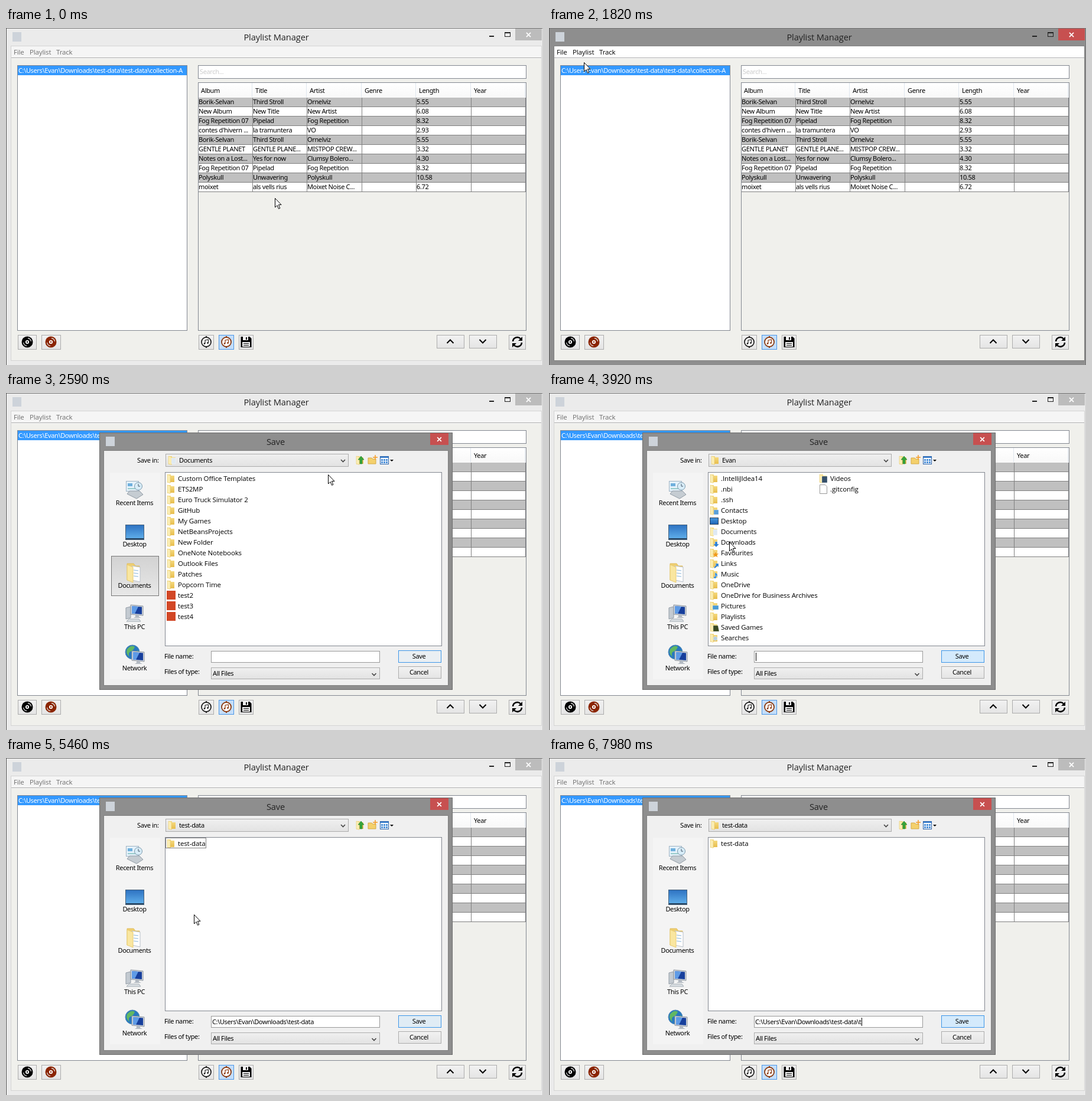
Write an HTML page with a canvas that moves like this. It is 909 px wide and 571 px high and loops after 8000 ms.

```html
<!DOCTYPE html>
<html lang="en">
<head>
<meta charset="utf-8">
<title>Playlist Manager</title>
<style>
html, body { margin: 0; width: 100%; height: 100%; overflow: hidden; background: #ebebeb; }
canvas { display: block; }
</style>
</head>
<body>
<canvas width="909" height="571"></canvas>
<script>
const ctx = document.querySelector('canvas').getContext('2d');
const LOOP = 8000, STEP = 70;
const FONTS = {
  small: ['11px "Noto Sans", sans-serif', '-0.36px'],
  ui: ['11.5px "Open Sans", sans-serif', '-0.13px'],
  title: ['14.6px "Open Sans", sans-serif', '-0.1px']
};

// Moments when the state changes
const FOCUS = 1120, DIALOG = 2310, GO_UP = 3360, GO_DOWNLOADS = 4200, GO_DATA = 5460,
  HIDE_POINTER = 6650, CLICK_FIELD = 6930, TYPE_SLASH = 7560, TYPE_T = 7840;

// Pointer path: time, x, y
const PATH = [
  [0, 455, 288], [70, 455, 288], [140, 449, 287], [280, 446, 282], [1050, 246, 50], [1260, 246, 50],
  [1540, 39, 46], [1610, 59, 58], [1820, 59, 58], [2520, 545, 138], [2660, 545, 138],
  [3220, 600, 99], [3290, 598, 106], [3430, 598, 106], [3850, 305, 252], [4270, 305, 252],
  [4550, 340, 223], [4690, 333, 242], [5110, 318, 265], [5600, 318, 265], [5950, 324, 250],
  [6160, 400, 187], [6440, 664, 449], [6510, 684, 455], [6580, 660, 461], [6790, 585, 447], [8000, 585, 447]
];

const TRACKS = `Borik-Selvan|Third Stroll|Ornelviz|5.55
New Album|New Title|New Artist|6.08
Fog Repetition 07|Pipelad|Fog Repetition|8.32
contes d'hivern ...|la tramuntera|VO|2.93
Borik-Selvan|Third Stroll|Ornelviz|5.55
GENTLE PLANET|GENTLE PLANE...|MISTPOP CREW...|3.32
Notes on a Lost...|Yes for now|Clumsy Bolero...|4.30
Fog Repetition 07|Pipelad|Fog Repetition|8.32
Polyskull|Unwavering|Polyskull|10.58
moixet|als vells rius|Moixet Noise C...|6.72`.split('\n').map(r => r.split('|'));

// First letter of each entry selects its icon
const list = s => s.split('|');
const DOCUMENTS = list('fCustom Office Templates|fETS2MP|fEuro Truck Simulator 2|fGitHub|fMy Games|fNetBeansProjects|fNew Folder|fOneNote Notebooks|fOutlook Files|fPatches|fPopcorn Time|htest2|htest3|htest4');
const HOME = list('f.IntelliJIdea14|f.nbi|f.ssh|cContacts|tDesktop|dDocuments|DDownloads|sFavourites|lLinks|mMusic|fOneDrive|fOneDrive for Business Archives|pPictures|fPlaylists|gSaved Games|qSearches');
const HOME_2 = list('vVideos|w.gitconfig');
const DOWNLOADS = list('fdel|fets2mp_client|fets2mp_client (1)|fhashcat-0.47|fLogs|fVelvet Chart v.1.2|fPhotoshop CS6|ftest-data|fYetiPro_Windows7_DriverA|fYetiPro_Windows8_DriverA|i20140224_110523|i20140306_083124|i20140306_083151|bactualize|rbootstrap-3.3.1-dist');
const DOWNLOADS_2 = list('hHarbour|hHarbourValleyMP3|hHarbourMP3 (1)|hHarbourMP3|hHarbourMP3Low|jchromeinstall-8u25|rcommons-io-2.4-bin|WCV 2014 (1)|WCV 2014 (2)|WCV 2014|wGrim Raven Tides poster.psd|bdelete30 (1)|bdelete30|odeluge-1.3.10-win32-setup|iDSC_0061');

function fill(x, y, w, h, color) {
  ctx.fillStyle = color;
  ctx.fillRect(x, y, w, h);
}
function box(x, y, w, h, color, edge) {
  fill(x, y, w, h, edge);
  fill(x + 1, y + 1, w - 2, h - 2, color);
}
function fade(y0, y1, a, b) {
  const g = ctx.createLinearGradient(0, y0, 0, y1);
  g.addColorStop(0, a);
  g.addColorStop(1, b);
  return g;
}
function shape(d, x, y, color, edge, width = 1) {
  const p = new Path2D(d);
  ctx.save();
  ctx.translate(x, y);
  if (color) { ctx.fillStyle = color; ctx.fill(p); }
  if (edge) { ctx.strokeStyle = edge; ctx.lineWidth = width; ctx.stroke(p); }
  ctx.restore();
}
function disc(x, y, r, color, edge, width = 1) {
  ctx.beginPath();
  ctx.arc(x, y, r, 0, 7);
  if (color) { ctx.fillStyle = color; ctx.fill(); }
  if (edge) { ctx.strokeStyle = edge; ctx.lineWidth = width; ctx.stroke(); }
}
function text(s, x, y, font = 'small', color = '#000', align = 'left') {
  [ctx.font, ctx.letterSpacing] = FONTS[font];
  ctx.fillStyle = color;
  ctx.textAlign = align;
  ctx.fillText(s, x, y);
}
function button(x, y, w, h, on) {
  box(x, y, w, h, on ? '#c4defa' : fade(y, y + h, '#f2f2f2', '#e4e4e4'), on ? '#4b96e6' : '#acacac');
}
const logo = (x, y) => fill(x, y, 15, 16, '#cdd3da');

function note(x, y, color) {
  disc(x, y, 8, '#fff', color, 1.8);
  shape('M-2 2.500V-3L3.500-4V1.500', x, y, null, color, 1.2);
  disc(x - 3, y + 2.7, 1.4, color);
  disc(x + 2.5, y + 1.7, 1.4, color);
  fill(x - 1, y - 10, 2, 2, color);
  fill(x - 1, y + 8, 2, 2, color);
}
function record(x, y, color) {
  disc(x, y, 9.5, color);
  shape('M1-6.500A6.500 6.500 0 0 1 6.500-1M-1 6.500A6.500 6.500 0 0 1-6.500 1', x, y, null, '#ddd', 1.3);
  disc(x, y, 2.2, null, '#fff', 1.8);
}
function closeMark(x, y, r) {
  shape(`M${-r} ${-r}L${r} ${r}M${r} ${-r}L${-r} ${r}`, x, y, null, '#fff', 1.7);
}

function mainWindow(active) {
  fill(0, 0, 909, 571, active ? '#8e8e8e' : '#ebebeb');
  fill(0, 0, 909, 1, '#777');
  fill(0, 0, 1, 571, '#555');
  fill(908, 0, 1, 571, active ? '#777' : '#c8c8c8');
  logo(11, 7);
  text('Playlist Manager', 457.5, 21, 'title', '#222', 'center');
  fill(818, 13, 8, 2, '#222');
  ctx.strokeStyle = '#222';
  ctx.lineWidth = 1;
  ctx.strokeRect(844.5, 7.5, 9, 7);
  fill(844, 7, 10, 2, '#222');
  fill(862, 1, 45, 20, active ? '#c75050' : '#bcbcbc');
  closeMark(884.5, 11.5, 3.6);

  box(8, 30, 899, 534, '#f0f0ec', active ? '#828282' : '#d4d4d4');
  fill(9, 31, 897, 19, active ? '#fff' : '#f5f5f5');
  fill(9, 50, 897, 1, '#a9a9a9');
  fill(9, 51, 897, 1, '#fff');
  const ink = active ? '#000' : '#6d6d6d';
  [['File', 13], ['Playlist', 40], ['Track', 85]].forEach(([s, x]) => text(s, x, 45, 'ui', ink));

  box(19, 63, 288, 450, '#fff', '#828790');
  fill(20, 64, 286, 16, '#3399ff');
  text('C:\\Users\\Evan\\Downloads\\test-data\\test-data\\collection-A', 21, 76, 'small', '#fff');
  box(325, 63, 556, 23, '#fff', '#828790');
  text('Search...', 328, 78, 'small', '#ccc');
  table();

  button(20, 520, 32, 25);
  record(36, 532, '#000');
  button(60, 520, 33, 25);
  record(76, 532, '#8b2500');
  button(326, 520, 26, 25);
  note(339, 532, '#222');
  button(360, 520, 26, 25, true);
  note(373, 532, '#8b3a10');
  button(394, 520, 25, 25);
  shape('M-9-9H6L9-6V9H-9Z', 406.5, 532, '#000');
  fill(401, 523, 9, 6, '#eee');
  fill(406, 524, 2, 4, '#000');
  fill(400, 532, 13, 8, '#eee');
  fill(402, 534, 9, 1, '#000');
  fill(402, 537, 9, 1, '#000');
  button(729, 520, 47, 23);
  shape('M-5.5 3L0-2.5L5.5 3', 752, 531, null, '#000', 2);
  button(784, 520, 47, 23);
  shape('M-5.5-3L0 2.5L5.5-3', 807, 531, null, '#000', 2);
  button(851, 520, 29, 25);
  shape('M-7.5-1A7.5 7.5 0 0 1 5.5-5.5M7.5 1A7.5 7.5 0 0 1-5.5 5.5', 865.5, 532, null, '#000', 2.5);
  shape('M8.5-9V-2H1.5ZM-8.5 9V2H-1.5Z', 865.5, 532, '#000');
}

function table() {
  const edges = [417, 509, 602, 694, 787, 879];
  box(325, 92, 556, 421, '#f0f0ec', '#828790');
  fill(326, 93, 554, 25, fade(93, 118, '#fff', '#f8f8f8'));
  ['Album', 'Title', 'Artist', 'Genre', 'Length', 'Year'].forEach((s, i) => {
    text(s, [330, 422, 514, 607, 699, 792][i], 110);
    fill(edges[i] - 1, 93, 1, 24, '#dfe6ee');
  });
  TRACKS.forEach((row, r) => {
    const y = 118 + 16 * r;
    fill(326, y, 554, 15, r % 2 ? '#fff' : '#c0c0c0');
    fill(326, y + 15, 554, 1, '#808080');
    row.forEach((s, i) => text(s, [326, 418, 510, 695][i], y + 11));
  });
  edges.forEach(x => fill(x, 118, 1, 160, '#808080'));
}

// Small marks laid over the folder icon
const BADGES = {
  c: ['M7 7h8v8h-8z', '#5aa0d8'], d: ['M6 4h7v10h-7z', '#dfe9f2'],
  D: ['M9 7h4v4h3l-5 5-5-5h3z', '#2b7fd6'], s: ['M10 5l1.5 4h4l-3 2.5 1 4-3.500-2-3.500 2 1-4-3-2.500h4z', '#f09a1a'],
  l: ['M7 15l4-5-2-2h6v6l-2-2-4 4z', '#2b7fd6'], m: ['M9 5l4 3v4h-2v-3v6h-4v-3h2z', '#2f8bdc'],
  p: ['M5 7h10v7h-10z', '#4a9bd4'], g: ['M6 5h8l2 10h-10z', '#3a4a22'],
  q: ['M13 9a3.500 3.500 0 1 1-7 0a3.500 3.500 0 1 1 7 0M6 12l-3 4', '#b9cfdd'], v: ['M5 4h9v11h-9z', '#35506a']
};
const SQUARES = { h: '#d24726', W: '#2b579a', r: '#5a2b52' };

function folder(x, y) {
  shape('M1 1H7V14.500H1ZM7 3H13V14H7Z', x, y, fade(0, 15, '#f8e08a', '#e6bb49'));
  shape('M1 1L6 2.500V15.500L1 14Z', x, y, '#fbeeb4', '#e9cc70', .6);
}
function icon(kind, x, y) {
  if (SQUARES[kind]) fill(x, y, 15, 15, SQUARES[kind]);
  else if (kind === 'b') {
    box(x, y + 2, 15, 12, '#6b2c10', '#a9794f');
    fill(x + 3, y + 5, 5, 5, '#d98328');
  } else if (kind === 'i' || kind === 't') {
    box(x, y + 2, 15, 12, fade(y, y + 14, '#4fa3e6', '#1c62b4'), kind === 'i' ? '#b4bcc4' : '#345');
    if (kind === 'i') shape('M2 11L6 7L9 10L11 8L14 12H2Z', x, y, '#dcebf2');
  } else if (kind === 'w') shape('M1.500.5H10.500L13.500 3.500V15.500H1.500Z', x, y, '#fff', '#999');
  else if (kind === 'j') logo(x, y);
  else if (kind === 'o') disc(x + 8, y + 8, 5.5, '#3f6f96');
  else {
    folder(x, y);
    if (BADGES[kind]) shape(BADGES[kind][0], x, y, BADGES[kind][1], '#fff8', .6);
  }
}
function files(names, x, textX) {
  names.forEach((s, i) => {
    const y = 137 + 18 * i;
    icon(s[0], x, y);
    text(s.slice(1), textX, y + 12, 'ui');
  });
}
function dashed(x, y, w, h) {
  ctx.setLineDash([1, 1]);
  ctx.strokeStyle = '#000';
  ctx.lineWidth = 1;
  ctx.strokeRect(x + .5, y + .5, w, h);
  ctx.setLineDash([]);
}
// Tilted screen on a small stand
function monitor(x, y) {
  shape('M0 0L21 2V18L0 16Z', x, y, '#d3d8de', '#8b949e');
  shape('M2 2L19 3.500V16L2 14.500Z', x, y, '#173f9c');
  shape('M2 2L13 3L7 15L2 14.500Z', x, y, '#5f9be6');
  shape('M8 17H14V20L18 22H5L8 20Z', x, y, '#b4bbc3');
}

function places(selected) {
  fill(176, 135, 85, 350, '#f4f4f4');
  if (selected) box(178, 276, 81, 68, fade(276, 344, '#d2d2d2', '#e8e8e8'), '#777');
  box(203, 149, 22, 18, '#e4f1fa', '#9fb4c4');
  fill(206, 153, 8, 5, '#6fb0dd');
  fill(206, 161, 15, 2, '#9cc');
  disc(224, 158, 6.5, '#d8edf8', '#7d98ab');
  shape('M0-4V0H3', 224, 158, null, '#456');
  shape('M-12 0L-8-5H9L15 1L4 8Z', 217, 171, '#c5ccd2', '#929ca5');
  box(202, 223, 32, 26, fade(223, 249, '#2c70c0', '#64b4ee'), '#47627c');
  fill(203, 246, 30, 2, '#26435f');
  shape('M0 0H11L14 4H21V28H0Z', 205, 289, '#efcf72', '#e0bd5c');
  shape('M8 4L22 6V31L8 28Z', 205, 289, '#fff', '#b8bfc8');
  shape('M11 11L19 12M11 16L19 17M11 21L19 22', 205, 289, null, '#8ab5d8');
  shape('M0 2L10 6V32L0 28Z', 205, 289, '#f9e6a0', '#e8cc74');
  shape('M0 3L8 1V20L0 22Z', 203, 361, '#c3cad1', '#949da6');
  monitor(211, 359);
  shape('M-9 0H8L11 4H-13Z', 217, 383, '#dbe0e4', '#a2abb3');
  disc(214, 439, 12, '#2878c0', '#5b90b8');
  shape('M-9-5Q-2-13 4-9Q2-3-3-1T-5 8Q-12 3-9-5M4 0L10-3L8 6Z', 214, 439, '#62b862');
  monitor(213, 437);
  ['Recent Items', 'Desktop', 'Documents', 'This PC', 'Network'].forEach((s, i) =>
    text(s, 217.5, 190 + 70 * i, 'small', '#000', 'center'));
}

function dialog(t, over) {
  const stage = t < GO_UP ? 0 : t < GO_DOWNLOADS ? 1 : t < GO_DATA ? 2 : 3;
  box(158, 67, 598, 436, '#8e8e8e', '#6c6c6c');
  box(165, 97, 584, 399, '#f0f0f0', '#808080');
  logo(169, 74);
  text('Save', 456.5, 88, 'title', '#222', 'center');
  fill(718, 68, 31, 20, '#c75050');
  closeMark(733.5, 78.5, 3.4);

  text('Save in:', 222, 118);
  box(270, 103, 310, 22, fade(103, 125, '#f0f0f0', '#e2e2e2'), '#acacac');
  icon('dfDf'[stage], 274, 106);
  text(['Documents', 'Evan', 'Downloads', 'test-data'][stage], 293, 118);
  const chevron = (x, y) => shape('M-3.500-2L0 1.500L3.500-2', x, y, null, '#444', 1.6);
  chevron(570.5, 115);
  folder(592, 106);
  shape('M-1 7V0H-4L1-6L6 0H3V7Z', 600, 113, '#35a53a', '#207a28', .6);
  shape('M0 3H6L8 5H13V13H0Z', 613, 107, '#f4d06c', '#d5aa42');
  shape('M0-4V4M-4 0H4', 625, 109, null, '#f59a23', 1.5);
  box(633, 107, 15, 14, '#fff', '#2860a8');
  fill(634, 108, 13, 2, '#3f83d0');
  for (let i = 0; i < 6; i++) fill(635 + i % 3 * 4, 112 + (i / 3 | 0) * 4, 3, 3, '#4a8fd8');
  shape('M0 0H6L3 3Z', 650, 113, '#000');
  places(stage === 0);

  box(269, 134, 469, 295, '#fff', '#828790');
  if (stage === 0) files(DOCUMENTS, 272, 291);
  if (stage === 1) {
    files(HOME, 272, 291);
    files(HOME_2, 457, 476);
  }
  if (stage === 2) {
    files(DOWNLOADS, 272, 291);
    files(DOWNLOADS_2, 519, 539);
    dashed(270, 135, 41, 17);
    fill(270, 412, 467, 16, '#f0f0f0');
    fill(287, 412, 135, 15, '#cdcdcd');
    shape('M2-3.500L-1.500 0L2 3.500', 278, 420, null, '#444', 1.6);
    shape('M-2-3.500L1.500 0L-2 3.500', 729, 420, null, '#444', 1.6);
  }
  if (stage === 3) {
    files(['ftest-data'], 272, 291);
    if (t < CLICK_FIELD) dashed(270, 135, 68, 17);
  }

  text('File name:', 268, 450);
  box(347, 437, 286, 20, '#fff', '#999');
  let path = stage < 2 ? '' : 'C:\\Users\\Evan\\Downloads' + (stage > 2 ? '\\test-data' : '');
  if (t >= TYPE_SLASH) path += '\\';
  if (t >= TYPE_T) path += 't';
  text(path, 349, 451);
  const caret = stage < 2 ? t % 1000 >= 600 : t >= CLICK_FIELD && (t < 7420 || t >= TYPE_SLASH);
  if (caret) fill(Math.round(350 + ctx.measureText(path).width), 440, 1, 14, '#000');

  text('Files of type:', 268, 476);
  box(347, 465, 286, 20, fade(465, 485, '#f0f0f0', '#e2e2e2'), '#acacac');
  text('All Files', 350, 479);
  chevron(623, 477);
  // The default button glows slowly, and fully under the pointer
  const glow = over ? 1 : .5 + .5 * Math.cos((t - 3920) / 2030 * 2 * Math.PI);
  box(664, 436, 73, 21, '#efefef', '#3c96e8');
  fill(665, 437, 71, 19, `rgba(212,234,252,${glow})`);
  text('Save', 699, 450, 'small', '#000', 'center');
  button(664, 463, 73, 21);
  text('Cancel', 699, 477, 'small', '#000', 'center');
}

function pointerAt(t) {
  const i = Math.max(1, PATH.findIndex(k => k[0] > t));
  const [a, x0, y0] = PATH[i - 1], [b, x1, y1] = PATH[i];
  const u = (t - a) / (b - a), e = u * u * (3 - 2 * u);
  return [Math.round(x0 + (x1 - x0) * e), Math.round(y0 + (y1 - y0) * e)];
}

function draw(now) {
  const t = Math.floor(now % LOOP / STEP) * STEP;
  const [x, y] = pointerAt(t);
  mainWindow(t >= FOCUS && t < DIALOG);
  if (t >= DIALOG) dialog(t, x > 664 && x < 737 && y > 436 && y < 457);
  if (t < HIDE_POINTER)
    shape('M.5.5V16L4 12.500L6.500 18.300L8.800 17.300L6.400 11.500H11Z', x, y, '#fff', '#000');
  requestAnimationFrame(draw);
}
requestAnimationFrame(draw);
</script>
</body>
</html>
```
